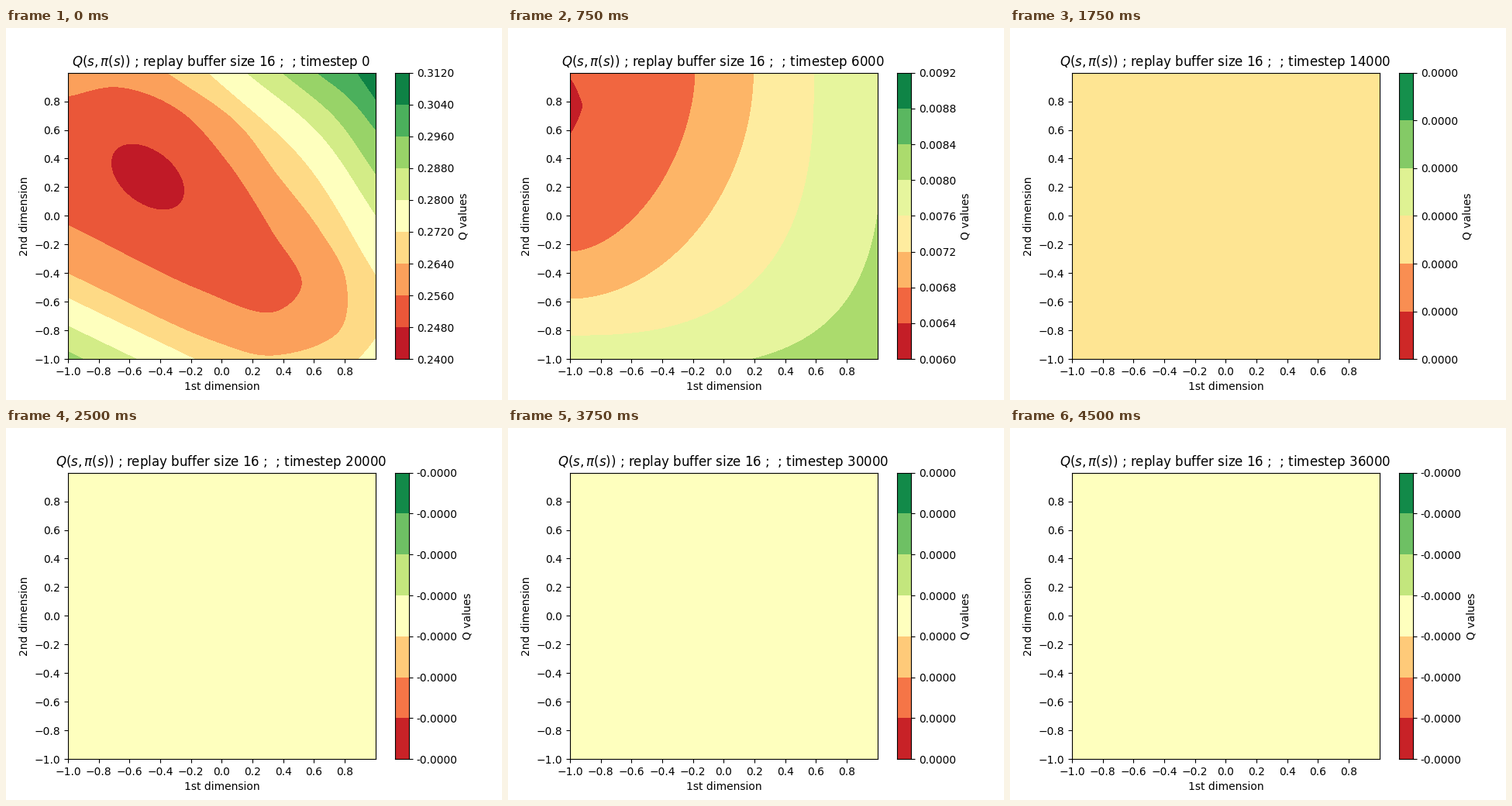
Write a matplotlib script that moves like this. It is 640 px wide and 480 px high and loops after 4750 ms.

```python
import numpy as np
import matplotlib.pyplot as plt
from matplotlib.animation import FuncAnimation
from matplotlib.patches import Polygon

FRAMES, INTERVAL = 19, 250
LEFT, RIGHT, TOP, BOTTOM = 80, 476.8, 57.6, 427.2
TL, TR, BL, BR = (79, 57), (478, 57), (79, 428), (478, 428)
CMAP = plt.get_cmap("RdYlGn")
rng = np.random.default_rng(4)


# Outlines are in stage pixels; a field lists (layer, outline) in paint order.
def curve(*keys):
    """Smooth open curve through a few key points."""
    p = np.array(keys, float)
    t = np.r_[0, np.cumsum(np.sqrt(np.hypot(*np.diff(p, axis=0).T)))]
    slope = np.gradient(p, t, axis=0)
    s = np.linspace(0, 1, 12)[:, None]
    parts = []
    for i, h in enumerate(np.diff(t)):
        parts.append((1 + 2 * s) * (1 - s) ** 2 * p[i]
                     + s * (1 - s) ** 2 * h * slope[i]
                     + s ** 2 * (3 - 2 * s) * p[i + 1]
                     + s ** 2 * (s - 1) * h * slope[i + 1])
    return list(map(tuple, np.concatenate(parts)))


def oval(cx, cy, a, b, power=2, tilt=0):
    """Superellipse with half axes a and b, turned by tilt degrees."""
    t = np.linspace(0, 2 * np.pi, 160)
    c, s = np.cos(t), np.sin(t)
    x = a * np.sign(c) * np.abs(c) ** (2 / power)
    y = b * np.sign(s) * np.abs(s) ** (2 / power)
    r = np.radians(tilt)
    return np.column_stack([cx + x * np.cos(r) - y * np.sin(r),
                            cy + x * np.sin(r) + y * np.cos(r)])


def flank(x, y0, y1, slope, bend, jitter=2):
    """Ragged edge that runs down and to the left."""
    y = np.arange(y0, y1, 11)
    t = y - y0
    x = x - slope * t - bend * t ** 2 + rng.uniform(-jitter, jitter, len(y))
    return list(zip(x, y))


def bowl():
    tops = (452, 400, 355, 309, 260)
    rights = (94, 133, 190, 243, 320)
    lefts = (510, 460, 416, 383, 347)
    field = []
    for i, (top, right, left) in enumerate(zip(tops, rights, lefts)):
        mid = ((top + 477) / 2 + 4 * i, (58 + right) / 2 - 4 * i)
        slope = (left, left + 0.48 * 400)
        field.append((7 - i, curve((top, 58), mid, (477, right))
                      + [(478, slope[1]), (79, slope[0]), TL]))
    field += [
        (4, [(478, 400), (468, 413), (455, 428), BR]),
        (2, curve((207, 58), (297, 122), (349, 189), (405, 262), (438, 325),
                  (430, 390), (345, 422), (270, 404), (80, 316)) + [TL]),
        (1, curve((80, 89), (145, 77), (222, 106), (285, 173), (343, 263),
                  (381, 332), (345, 366), (250, 337), (80, 253))),
        (0, oval(183, 192, 53, 33, tilt=38)),
    ]
    return field


def corner():
    widths = (450, 400, 336, 262, 197, 134)
    heights = (415, 372, 333, 294, 253, 200)
    powers = (5, 4.5, 3.7, 2.7, 1.9, 1.75)
    shapes = zip(range(6, 0, -1), widths, heights, powers)
    return ([(k, oval(LEFT, 58, a, b, n)) for k, a, b, n in shapes]
            + [(0, oval(LEFT, 95, 13, 30, 1.2))])


def ridge():
    pale = (flank(312, 58, 296, 0.45, 0.0007)
            + [(145, 293), (148, 312), (134, 310), (145, 270), (144, 250),
               (120, 240), (80, 236), BL, BR, TR])
    sand = (curve((477, 103), (435, 121), (380, 136), (310, 143))
            + flank(288, 149, 360, 0.65, 0.001)
            + [(100, 366), (92, 350), (103, 325), (101, 300), (80, 297),
               BL, BR])
    field = flat(5) + [(4, pale), (5, oval(120, 330, 5, 6, 1)), (3, sand)]

    knees = (225, 187, 150)
    bends = ((113, 365), (135, 357), (123, 388))
    ends = (403, 412, 427)
    for i, (knee, bend, end) in enumerate(zip(knees, bends, ends)):
        y = 269.5 + 55 * i
        field.append((2 - i, [(478, y), (knee, y), bend, (80, end), BL, BR]))

    crest = (58, 257, 0.36, 0.0007, 4)
    west = flank(250, *crest[:2], 0.26, 0.0007, 4)
    east = flank(298, *crest[:2], 0.46, 0.0007, 4)
    field += [(6, west + east[::-1]), (6, oval(163, 272, 2, 2, 1))]
    for y, size in ((80, 10), (135, 4), (174, 3), (213, 1)):
        t = y - 58
        x = 278 - 0.36 * t - 0.0007 * t ** 2
        field.append((7, oval(x, y, size * 0.6, size, 1)))
    return field


def flat(layer):
    return [(layer, [TL, TR, BR, BL])]


def stretch(field, anchor, scale):
    """Scale a field away from one corner of the plot."""
    anchor = np.array(anchor)
    return [(layer, anchor + (np.array(pts) - anchor) * scale)
            for layer, pts in field]


BOWL, CORNER, RIDGE = bowl(), corner(), ridge()
PLUS, MINUS = (1e-9, 0), (-1e-9, 0)
YELLOW, SAND, CREAM = (flat(3), 7), (flat(2), 6), (flat(3), 8)

# field, layer count, (lowest level, level step)
SCENES = [
    (BOWL, 9, (0.24, 0.008)),
    (stretch(BOWL, (RIGHT, BOTTOM), (1.25, 1.2)), 9, (0.128, 0.002)),
    (CORNER, 8, (0.044, 0.002)),
    (stretch(CORNER, (LEFT, TOP), (1.2, 1.15)), 8, (0.006, 0.0004)),
    (stretch(RIDGE, (LEFT, BOTTOM), (1.1, 1.3)), 8, (0.0008, 0.0001)),
    (RIDGE, 8, MINUS),
    (stretch(RIDGE, (LEFT, BOTTOM), (1, 1.15)), 8, MINUS),
    (*SAND, PLUS),
    (*YELLOW, PLUS),
    (*YELLOW, PLUS),
    (*YELLOW, MINUS),
    (*CREAM, PLUS),
    (*SAND, PLUS),
    (*SAND, MINUS),
    (*YELLOW, MINUS),
    (*YELLOW, PLUS),
    (*SAND, MINUS),
    (*YELLOW, PLUS),
    (*YELLOW, MINUS),
]

fig = plt.figure(figsize=(6.4, 4.8), dpi=100)
ax = fig.add_axes([0.125, 0.11, 0.62, 0.77])
cax = fig.add_axes([0.78375, 0.11, 0.028875, 0.77])


def to_data(pts):
    x, y = np.array(pts, float).T
    return np.column_stack([2 * (x - LEFT) / (RIGHT - LEFT) - 1,
                            2 * (BOTTOM - y) / (BOTTOM - TOP) - 1])


def draw_map(field, count, step):
    ax.clear()
    ax.set_facecolor(CMAP((count - 0.5) / count))
    for layer, pts in field:
        ax.add_patch(Polygon(to_data(pts), lw=0, antialiased=False,
                             fc=CMAP((layer + 0.5) / count)))
    ticks = np.arange(-10, 10, 2) / 10
    ax.set(xlim=(-1, 1), ylim=(-1, 1), xticks=ticks, yticks=ticks,
           xlabel="1st dimension", ylabel="2nd dimension")
    ax.set_title(rf"$Q(s,\pi(s))$ ; replay buffer size 16 ;  ; timestep {step}",
                 x=0.4985)


def draw_bar(count, levels):
    cax.clear()
    edges = np.arange(count + 1)
    shades = (edges[:-1, None] + 0.5) / count
    cax.pcolormesh([0, 1], edges, shades, cmap=CMAP, vmin=0, vmax=1)
    low, gap = levels
    cax.set(xlim=(0, 1), ylim=(0, count), xticks=[])
    cax.set_yticks(edges, [f"{low + gap * i:.4f}" for i in edges])
    cax.yaxis.tick_right()
    cax.yaxis.set_label_position("right")
    cax.set_ylabel("Q values")


def draw(frame):
    field, count, levels = SCENES[frame]
    draw_map(field, count, 2000 * frame)
    draw_bar(count, levels)
    return []


anim = FuncAnimation(fig, draw, frames=FRAMES, interval=INTERVAL,
                     repeat=True, repeat_delay=0)
plt.show()
```
